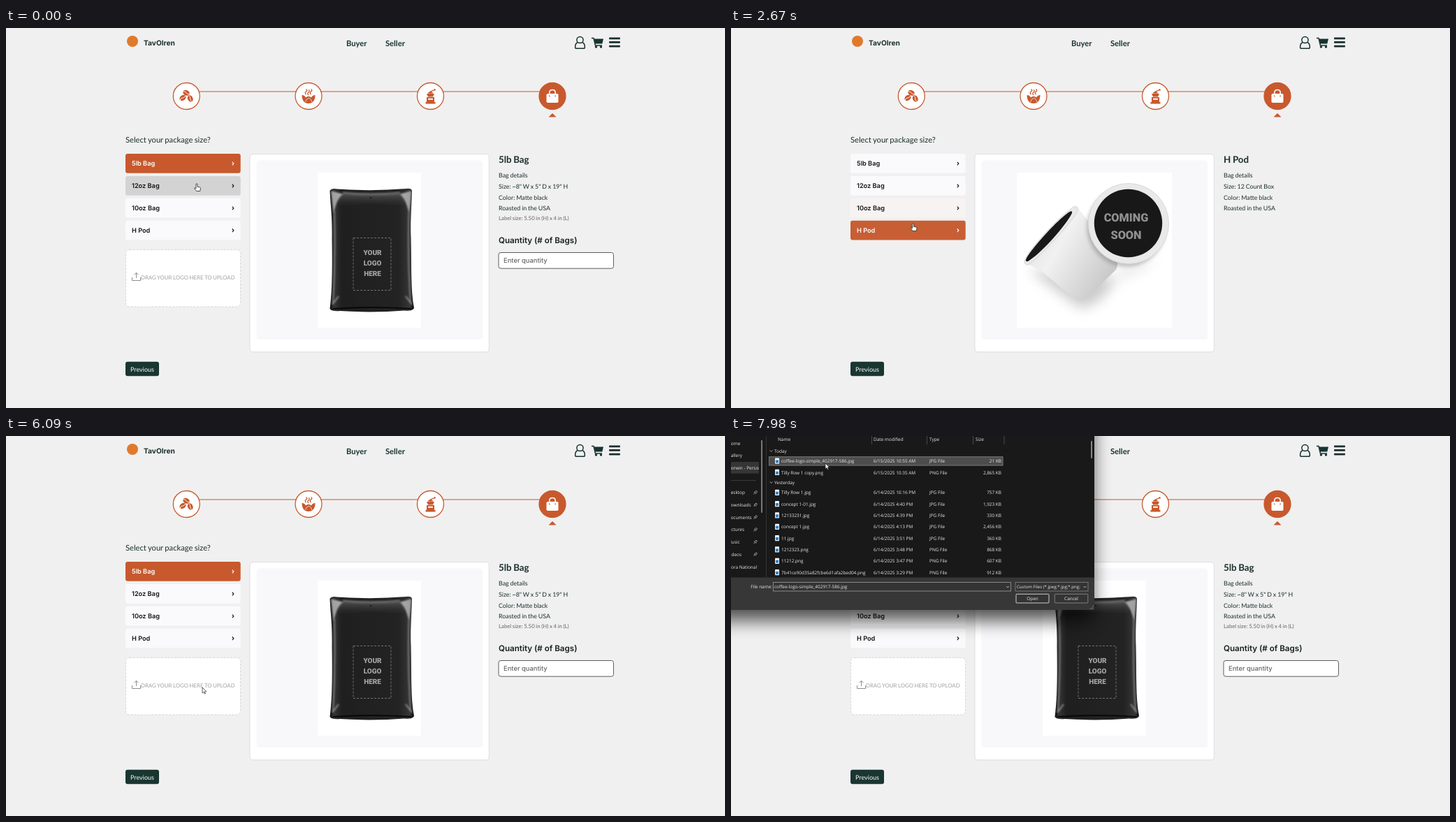
These frames come from a looping animation (1029x544 px, 8000 ms). An HTML page:

```html
<!DOCTYPE html>
<html lang="en">
<head>
<meta charset="utf-8">
<title>Package picker</title>
<style>
html, body { margin: 0; width: 100%; height: 100%; overflow: hidden; background: #f0f0f0; }
svg { display: block; width: 1029px; height: 544px; }
text { font-family: Lato, sans-serif; text-rendering: geometricPrecision; white-space: pre; word-spacing: -.045em; }
.ui { font-family: Inter, sans-serif; font-weight: 600; word-spacing: 0; }
.win { font-family: "Open Sans", sans-serif; font-size: 6.45px; fill: #e8e8e8; word-spacing: 0; }
.tight { font-size: 6.1px; }
.heavy { font-family: Roboto, sans-serif; font-weight: 900; text-anchor: middle; }
.b { font-weight: 700; }
.medium { font-weight: 500; }
.mid { text-anchor: middle; }
.end { text-anchor: end; }
</style>
</head>
<body>
<svg id="stage" viewBox="0 0 1029 544" xmlns="http://www.w3.org/2000/svg"></svg>
<script>
const LOOP = 8000, ORANGE = [200, 89, 45], PALE = [250, 250, 252], GREY = [211, 211, 211];
const INK = '#1b2f2d', ACCENT = '#c8592d';
const stage = document.getElementById('stage');
const $ = id => document.getElementById(id);

const text = (x, y, s, size, fill = INK, cls = '') =>
  `<text x="${x}" y="${y}" ${size ? `font-size="${size}" fill="${fill}"` : ''} class="${cls}">${s}</text>`;
const rect = (x, y, w, h, fill, more = '') =>
  `<rect x="${x}" y="${y}" width="${w}" height="${h}" fill="${fill}" ${more}/>`;
const path = (d, fill, more = '') => `<path d="${d}" fill="${fill}" ${more}/>`;
const line = (d, stroke, width = 1, more = '') =>
  path(d, 'none', `stroke="${stroke}" stroke-width="${width}" ${more}`);
const win = (x, y, s, cls = '') => text(x, y, s, 0, 0, 'win ' + cls);
const show = (id, on) => { $(id).style.display = on ? '' : 'none'; };

const small = ['~4" W x 3" D x 12" H', 'Label size: 1.75 in (H) x 3.75 in (L)'];
const products = [
  { name: '5lb Bag', size: '~8" W x 5" D x 19" H', label: 'Label size: 5.50 in (H) x 4 in (L)', art: 'large' },
  { name: '12oz Bag', size: small[0], label: small[1], art: 'pouch' },
  { name: '10oz Bag', size: small[0], label: small[1], art: 'pouch' },
  { name: 'H Pod', size: '12 Count Box', label: '', art: 'pod' }
];

// [time, product]
const picks = [[-999, 0], [300, 1], [1380, 2], [2540, 3], [3480, 0]];
// [time, x, y] of the pointer tip
const moves = [
  [0, 273, 223], [420, 273, 223], [860, 271, 262], [1750, 271, 262], [2250, 260.5, 280],
  [2850, 260.5, 280], [3350, 260.5, 195], [4000, 260.5, 195], [5000, 281, 360],
  [6240, 281, 360], [6660, 141, 60], [6800, 141, 60], [7300, 135, 39], [LOOP, 135, 39]
];
const DIALOG = 6270, HOVER_FILE = 7150, PICK_FILE = 7480;

const defs = `<defs>
  <linearGradient id="film"><stop offset="0" stop-color="#0c0c0c"/><stop offset=".05" stop-color="#353535"/>
    <stop offset=".14" stop-color="#1f1f1f"/><stop offset=".82" stop-color="#232323"/>
    <stop offset=".95" stop-color="#363636"/><stop offset="1" stop-color="#090909"/></linearGradient>
  <linearGradient id="matte" x2=".2" y2="1"><stop offset="0" stop-color="#2b2b2b"/>
    <stop offset=".6" stop-color="#333"/><stop offset="1" stop-color="#242424"/></linearGradient>
  <linearGradient id="gloss" x2="0" y2="1"><stop offset="0" stop-color="#aaa" stop-opacity=".75"/>
    <stop offset="1" stop-color="#555" stop-opacity="0"/></linearGradient>
  <linearGradient id="shell" x2="1" y2=".6"><stop offset="0" stop-color="#d9d9d9"/>
    <stop offset=".45" stop-color="#f1f1f1"/><stop offset="1" stop-color="#c9c9c9"/></linearGradient>
  <filter id="soft" x="-50%" y="-50%" width="200%" height="200%"><feGaussianBlur stdDeviation="9"/></filter>
  <filter id="drop" x="-20%" y="-30%" width="140%" height="160%"><feGaussianBlur stdDeviation="13"/></filter>
  <filter id="haze" x="-50%" y="-50%" width="200%" height="200%"><feGaussianBlur stdDeviation="2.5"/></filter>
  <filter id="blur" filterUnits="userSpaceOnUse" x="446" y="207" width="148" height="222"><feGaussianBlur stdDeviation="1.1"/></filter>
  <clipPath id="side"><rect width="40" height="205"/></clipPath>
</defs>`;

function bean(x, y, r) {
  return `<g transform="translate(${x} ${y}) rotate(${r})"><ellipse rx="5" ry="3.7" fill="${ACCENT}"/>
    ${line('M-5 .4Q-2-1.6 0 0T5-.4', '#fff', .8)}</g>`;
}

function header() {
  const bars = [13.5, 19.1, 24.7].map(y => rect(863, y, 16, 2.7, INK, 'rx="1"')).join('');
  return `<circle cx="181" cy="19" r="8" fill="#e0792c"/>` +
    text(197, 24.8, 'TavOlren', 10.2, INK, 'ui b') +
    text(487, 26, 'Buyer', 11.2, '#17332f', 'b') + text(543, 26, 'Seller', 11.2, '#17332f', 'b') +
    `<circle cx="821.5" cy="17" r="4.6" fill="none" stroke="#17332f" stroke-width="1.5"/>` +
    line('M818 20.5C815 22 814.6 24.5 814.6 27.5Q814.6 29.3 816.5 29.3H826.5Q828.4 29.3 828.4 27.5C828.4 24.5 828 22 825 20.5', '#17332f', 1.5) +
    path('M841.5 15.5H855L853.3 22.5H843Z', '#17332f') +
    line('M838 14.5H841L843.5 25H853', '#17332f', 1.5) +
    `<circle cx="844.5" cy="27" r="1.7" fill="#17332f"/><circle cx="851.5" cy="27" r="1.7" fill="#17332f"/>` + bars;
}

function stepper() {
  const rings = [258.3, 433, 607.5, 782].map((x, i) =>
    `<circle cx="${x}" cy="97.5" r="19" fill="${i > 2 ? ACCENT : '#fff'}" stroke="${ACCENT}" stroke-width="1.3"/>`).join('');
  const beans = bean(258, 92.8, 25) + bean(253, 100, -35) + bean(263.7, 101, 65);
  const bowl = path('M423.5 96C426 96 428 97.5 429 99.5Q433 96 437 99.5C438 97.5 440 96 442.5 96C442.5 104 439 108 433 108S423.5 104 423.5 96Z', ACCENT) +
    line('M428.5 106Q430 101 433 100.5T438 106', '#fff', .7) +
    [429.5, 433, 436.5].map((x, i) => line(`M${x} ${i == 1 ? 96 : 95}q-2.5-2 0-4t0-3.5`, ACCENT, 1.3)).join('');
  const mill = path('M602 94H613L611 98.5H604ZM602 99H613V106H602ZM600.5 106H614.5V108.5H600.5Z', ACCENT) +
    rect(604, 100.8, 7, 2, '#fff', 'rx=".6"') + line('M607.5 94V91L613.5 88.5', ACCENT, 1.3) +
    `<circle cx="613.5" cy="88.5" r="1.3" fill="${ACCENT}"/>` + path('M604 93.5Q604 91 607.5 91T611 93.5Z', ACCENT);
  const bag = rect(773.5, 94, 17, 13, '#fff', 'rx="1.8"') +
    line('M777.8 96V92.5Q777.8 88.5 782 88.5T786.2 92.5V96', '#fff', 1.6) +
    [777.8, 786.2].map(x => `<circle cx="${x}" cy="97.3" r=".9" fill="${ACCENT}"/>`).join('');
  return line('M258 91H782', ACCENT, 1.2) + rings + beans + bowl + mill + bag + path('M782 122L787.5 127.5H776.5Z', ACCENT);
}

function menu() {
  return text(171, 164.3, 'Select your package size?', 11.2) + products.map((p, i) => {
    const y = 180 + i * 31.9;
    return `<g id="item${i}">` + rect(171, y, 164.7, 27.8, '#fafafc', 'rx="3"') +
      text(180, y + 16.9, p.name, 9.2, 'currentColor', 'ui') +
      line(`M323.8 ${y + 11.8}L325.8 ${y + 14.1}L323.8 ${y + 16.4}`, 'currentColor', 1.2) + '</g>';
  }).join('');
}

function upload() {
  return `<g id="upload">` + rect(171.5, 317.5, 164, 81.5, '#fff', 'rx="5" stroke="#d6d6d6" stroke-dasharray="3 2"') +
    line('M180.5 357V361.5H192.5V357M186.5 358V350.5M183.5 353.3L186.5 350.3L189.5 353.3', '#8d8d8d', 1) +
    text(193, 360.3, 'DRAG YOUR LOGO HERE TO UPLOAD', 7.8, '#a0a0a0') + '</g>';
}

const stack = (x, ys, words, size, fill) => words.split(' ').map((w, i) => text(x, ys[i], w, size, fill, 'heavy')).join('');

function artwork() {
  const body = 'M463.5 233Q466 229 474 230.5Q524 234 573 230Q580 229 581 233C580.5 255 578.5 275 579.5 300C580.5 340 579 375 584 401Q581 406 570 404.5Q524 408 478 405Q466 406 463.5 402C467 375 467 340 466.5 300C467 270 464.5 255 463.5 233Z';
  const shine = `<g filter="url(#blur)">` +
    path('M465 233L482 238Q473 244 469 266Q467 250 465 233Z', '#b5b5b5', 'opacity=".85"') +
    path('M580 233L564 238Q572 244 577 266Q579 250 580 233Z', '#b5b5b5', 'opacity=".85"') +
    line('M470 262Q472 330 468 394M576.5 262Q574.5 330 579 394', '#777', 2) +
    line('M482 236Q524 240 564 236', '#6c6c6c', 3) +
    line('M467 396L476 384M581 396L572 384', '#8a8a8a', 2) + '</g>';
  const large = rect(446, 207, 147.5, 222, '#fff') + path(body, 'url(#film)') +
    path('M470 236Q524 240 575 236L568 256Q524 248 478 256Z', 'url(#gloss)', 'opacity=".5" filter="url(#blur)"') + shine +
    line('M468 402Q524 398 580 402', '#090909', 2) +
    `<circle cx="522" cy="243" r="1" fill="#111"/>` +
    rect(497, 300.5, 54, 75, 'none', 'stroke="#858585" stroke-width=".8" stroke-dasharray="3 2"') +
    stack(524.5, [325, 340, 355], 'YOUR LOGO HERE', 10, '#a5a5a5');
  const pouch = rect(409, 207, 222, 222, '#fff') +
    path('M470 230Q519 231 569 230Q571 231 570.5 234L570 268L574 411Q573 414 570 414H467Q463.5 414 463.5 411L468.5 268L468 234Q468 230 470 230Z', 'url(#matte)') +
    line('M469 247H570M469 250H570', '#151515', 1.1) + line('M469 261Q520 264 570 261', '#191919', 1.6) +
    line('M470 263Q520 266 569 263', '#4b4b4b', .8) + line('M466 408H572', '#171717', 1) +
    `<circle cx="518" cy="285" r="8" fill="#313131" stroke="#222"/><circle cx="518" cy="285" r="1" fill="#1a1a1a"/>` +
    rect(490.5, 313, 60, 82, 'none', 'stroke="#5c5c5c" stroke-width=".7"') +
    stack(520, [343.5, 357, 370.5], 'YOUR DESIGN HERE', 9.3, '#dedede');
  const pod = rect(409, 207, 222, 222, '#fff') +
    path('M425 345L498 400Q530 402 556 350L608 330Q590 345 552 358Z', '#999', 'opacity=".5" filter="url(#soft)"') +
    path('M422 337Q438 343 447 350L489 386Q501 394 510 386L551 346Q560 330 530 300L496 257Z', 'url(#shell)') +
    path('M420 336C416 330 458 281 485 260Q493 253 495 256Q499 262 488 274C471 296 438 331 427 338Q422 341 420 336Z', '#e9e9e9', 'stroke="#cfcfcf" stroke-width=".8"') +
    path('M422 333C421 327 460 281 483 264Q489 260 488 265C480 282 445 321 428 332Q423 336 422 333Z', '#191919') +
    `<circle cx="566" cy="285" r="57" fill="#777" opacity=".4" filter="url(#haze)"/>
     <circle cx="569" cy="280" r="57.5" fill="#e9e9e9" stroke="#dadada"/>
     <circle cx="568.5" cy="279.5" r="48.7" fill="#181818"/>` +
    text(565.5, 277, 'COMING', 16.3, '#919191', 'heavy') + text(565.5, 302, 'SOON', 16.3, '#919191', 'heavy');
  return rect(349, 180.5, 342.3, 283.3, '#fff', 'rx="4" stroke="#dcdcdf" stroke-width=".9"') +
    rect(358.5, 189.5, 323.5, 256.5, '#f8f8fb', 'rx="4"') +
    `<g id="large">${large}</g><g id="pouch">${pouch}</g><g id="pod">${pod}</g>`;
}

function details(p) {
  return text(705, 193.3, p.name, 13.3, INK, 'b') +
    ['Bag details', 'Size: ' + p.size, 'Color: Matte black', 'Roasted in the USA']
      .map((s, i) => text(705, 214 + i * 15.8, s, 8.85)).join('') + text(705, 275, p.label, 7.8, '#666');
}

function quantity() {
  return `<g id="quantity">` + text(705, 307.5, 'Quantity (# of Bags)', 11.6, '#151f1e', 'ui') +
    rect(705, 321.5, 164.5, 22.7, '#fff', 'rx="3" stroke="#4d4d4d" stroke-width=".9"') +
    text(712, 335.7, 'Enter quantity', 9.4, '#666', 'ui medium') + '</g>';
}

const fileName = 'coffee-logo-simple_402917-586.jpg';
const files = [
  [fileName, '15/2025 10:55 AM', '21'], ['Tilly Row 1 copy.png', '15/2025 10:35 AM', '2,865'],
  ['Tilly Row 1.jpg', '14/2025 10:16 PM', '757'], ['concept 1-01.jpg', '14/2025 4:40 PM', '1,923'],
  ['12133231.jpg', '14/2025 4:39 PM', '330'], ['concept 1.jpg', '14/2025 4:13 PM', '2,456'],
  ['11.jpg', '14/2025 3:51 PM', '360'], ['1212323.png', '14/2025 3:48 PM', '868'],
  ['11212.png', '14/2025 3:47 PM', '607'], ['7b41ce90d35a82fcbe6d1afa2bed04.png', '14/2025 3:29 PM', '912']
];

function dialog() {
  const rows = files.map(([name, date, kb], i) => {
    const y = i < 2 ? 38.2 + i * 16.3 : 83.4 + (i - 2) * 16.33;
    return rect(63, y - 6.7, 6, 8.2, '#f2f2f2', 'rx=".6"') + rect(64, y - 3.7, 4, 4, '#2f7fc4') +
      win(72, y, name) + win(204, y, '6/' + date) +
      win(284, y, name.slice(-3).toUpperCase() + ' File') + win(387, y, kb + ' KB', 'end');
  }).join('');
  const places = ['Desktop', 'Downloads', 'Documents', 'Pictures', 'Music', 'Videos'].map((s, i) => {
    const y = 83.3 + i * 17.7;
    return win(-5, y, s) + line(`M32.5 ${y}L34.5 ${y - 2}M33 ${y - 3.5}L36 ${y - .5}M34 ${y - 3}L36 ${y - 5}L37.5 ${y - 3.5}L35.5 ${y - 1.5}`, '#bbb', .9);
  }).join('');
  const drop = (x, y) => line(`M${x - 2} ${y - 1}L${x} ${y + 1}L${x + 2} ${y - 1}`, '#ccc', .8);
  const button = (x, w, s, edge) => rect(x, 226.3, w, 12.7, '#343434', `rx="1" stroke="${edge}" stroke-width=".9"`) +
    win(x + w / 2, 235, s, 'mid');
  return `<g id="dialog">` + rect(-100, -40, 618, 304, '#000', 'opacity=".68" filter="url(#drop)"') +
    rect(0, 0, 520, 249, '#373737') + rect(0, 0, 520, 202.5, '#191919') +
    line('M50.5 0V202', '#333', 1) + line('M201.5 0V12M280.5 0V12M346.5 0V12M391 0V12', '#555', .8) +
    rect(43.2, 6, 1.7, 104, '#8a8a8a', 'rx=".8"') + rect(515.2, 7, 1.7, 25, '#9a9a9a', 'rx=".8"') +
    win(67, 7.4, 'Name') + win(204, 7.4, 'Date modified') + win(284, 7.4, 'Type') + win(350, 7.4, 'Size') +
    rect(54.5, 29.8, 334.5, 12.3, '#4d4d4d', 'id="mark" stroke="#8a8a8a" stroke-width=".8"') +
    drop(57.5, 21.5) + win(62, 23.7, 'Today') + drop(57.5, 66.5) + win(62, 68.8, 'Yesterday') + rows +
    `<g clip-path="url(#side)">` + rect(0, 37, 40, 16.8, '#353535', 'rx="1.5"') +
    win(-5, 12.7, 'Home') + win(-5, 30, 'Gallery') + win(-5, 47.7, 'Dorwin - Personal') +
    line('M0 63.5H36', '#444', .8) + places + win(0, 189.5, 'ora National') + '</g>' +
    win(59, 218, 'File name:', 'end') + rect(60.5, 209.5, 340, 12.5, '#333', 'stroke="#a0a0a0" stroke-width=".8"') +
    `<g id="caret">${line('M62.5 211.5V220', '#fff', .8)}</g><g id="chosen">${win(62, 218, fileName)}</g>` + drop(396, 216) +
    rect(407, 209.5, 104, 12.5, '#333', 'stroke="#858585" stroke-width=".8"') +
    win(409, 218, 'Custom Files (*.jpeg;*.jpg;*.png;', 'tight') + drop(506.5, 216) +
    button(408, 47, 'Open', '#ddd') + button(463.3, 47.5, 'Cancel', '#8a8a8a') +
    line('M514 248L519 243M516.5 248L519 245.5', '#aaa', .9, 'stroke-dasharray="1 1"') + '</g>';
}

const pointers = `<g id="pointer">
  <g id="hand">${path('M-1 1Q-1-.3 0-.3T1 1V4.3L4.5 5Q5.6 5.4 5.4 6.7L4.7 10.5H-.3L-3.3 6.8Q-3.6 5.7-2.5 5.7L-1 6.9Z', '#fff', 'stroke="#222" stroke-width=".8"')}</g>
  <g id="arrow">${path('M0 0V8L1.9 6.4L3.2 9.2L4.5 8.6L3.2 5.9H5.7Z', '#fff', 'stroke="#222" stroke-width=".7"')}</g></g>`;

stage.innerHTML = defs + rect(0, 0, 1029, 544, '#f0f0f0') + header() + stepper() + menu() + upload() + artwork() +
  '<g id="details"></g>' + quantity() + rect(171, 477.7, 48, 20.5, '#193631', 'rx="3"') +
  text(195, 491.6, 'Previous', 9, '#fff', 'mid') + dialog() + pointers;

const mix = (a, b, p) => `rgb(${a.map((v, i) => Math.round(v + (b[i] - v) * p))})`;
const ease = p => p * p * (3 - 2 * p);

function pointerAt(t) {
  const i = Math.max(1, moves.findIndex(m => m[0] > t));
  const [t0, x0, y0] = moves[i - 1], [t1, x1, y1] = moves[i];
  const p = ease((t - t0) / (t1 - t0));
  return [x0 + (x1 - x0) * p, y0 + (y1 - y0) * p];
}

let shown = -1;
function select(n) {
  if (n === shown) return;
  shown = n;
  const p = products[n];
  $('details').innerHTML = details(p);
  ['large', 'pouch', 'pod'].forEach(id => show(id, id === p.art));
  show('upload', p.art !== 'pod');
  show('quantity', p.art !== 'pod');
}

function draw(t) {
  const k = picks.filter(p => p[0] <= t).length - 1;
  const [since, now] = picks[k], before = k ? picks[k - 1][1] : -1;
  const fade = ease(Math.min(1, (t - since) / 150));
  const [x, y] = pointerAt(t), open = t >= DIALOG;
  const row = Math.floor((y - 180) / 31.9);
  const over = !open && row >= 0 && row < 4 && y - 180 - row * 31.9 < 27.8 ? row : -1;

  select(now);
  products.forEach((_, i) => {
    const rest = i === over ? GREY : PALE, item = $('item' + i);
    item.firstChild.setAttribute('fill',
      i === now ? mix(rest, ORANGE, fade) : i === before ? mix(ORANGE, rest, fade) : mix(rest, rest, 0));
    item.style.color = i === now ? '#fff' : '#151515';
  });
  const picked = t >= PICK_FILE;
  show('dialog', open);
  show('mark', t >= HOVER_FILE);
  $('mark').setAttribute('fill', picked ? '#4d4d4d' : '#333');
  $('mark').setAttribute('stroke', picked ? '#8a8a8a' : 'none');
  show('chosen', picked);
  show('caret', !picked && (t - DIALOG) % 1060 < 530);
  $('pointer').setAttribute('transform', `translate(${x} ${y})`);
  show('hand', over >= 0);
  show('arrow', over < 0);
}

const start = performance.now();
function frame() {
  draw((performance.now() - start) % LOOP);
  requestAnimationFrame(frame);
}
frame();
</script>
</body>
</html>
```
